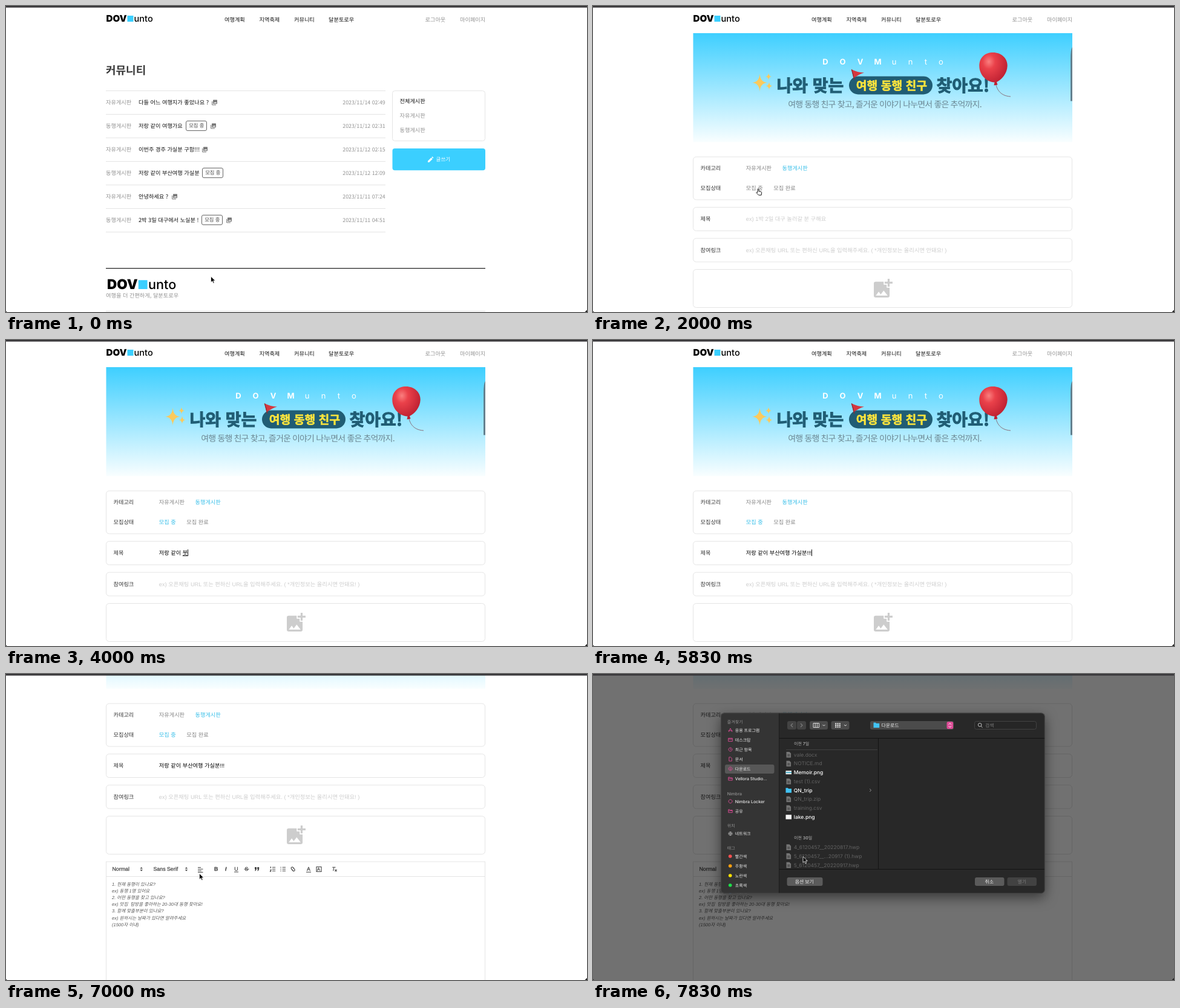
These frames come from a looping animation (960 by 507 pixels, 8000 ms). An HTML page:

```html
<!DOCTYPE html>
<html lang="ko">
<head>
<meta charset="utf-8">
<title>커뮤니티</title>
<style>
html, body { margin: 0; width: 100%; height: 100%; overflow: hidden; background: #fff; }
svg { display: block; width: 100vw; height: 100vh; }
text { font: 9.2px "Noto Sans CJK KR", "Noto Sans CJK", sans-serif; fill: #111; white-space: pre; text-rendering: geometricPrecision; }
.m { font-weight: 500; }
.g { fill: #929292; }
.label { font-weight: 500; fill: #333; }
.opt { fill: #858585; }
.opt.on { fill: #38bfe9; }
.hint, .typed { font-family: "Liberation Sans", "Noto Sans CJK KR", sans-serif; }
.hint { font-size: 9.27px; fill: #cdcdcd; }
.typed { fill: #000; }
.box { fill: #fff; stroke: #e5e5e5; }
.rule { stroke: #e4e4e4; }
.tool { font: 8.8px "Liberation Sans", sans-serif; fill: #444; stroke: #444; stroke-width: .25; }
.memo { font: italic 7.5px "Liberation Sans", "Noto Sans CJK KR", sans-serif; fill: #5a5a5a; }
.logo { font: 900 15.2px Inter, sans-serif; fill: #000; }
.thin { font-weight: 500; font-size: 14.6px; }
.spaced { font: 700 13px Inter, sans-serif; fill: #fff; text-anchor: middle; }
.head { font-size: 28px; font-weight: 900; fill: #205d74; stroke: #205d74; stroke-width: 1; }
.pill { font-size: 19.3px; font-weight: 700; fill: #ffe63c; stroke: #ffe63c; stroke-width: .5; }
.line { fill: none; stroke: #444; stroke-width: 1.1; }
.side { font-size: 7px; font-weight: 500; fill: #ececec; }
.side, .file, .btn { font-family: Inter, "Noto Sans CJK KR", sans-serif; }
.cap { fill: #929292; }
.file { font-size: 8.5px; fill: #626262; }
.file.on { fill: #fff; font-weight: 500; }
.btn { font-size: 7.9px; font-weight: 500; fill: #eee; }
.ico { fill: none; stroke: var(--accent); stroke-width: .9; }
.shadow { filter: drop-shadow(0 7px 10px rgba(0, 0, 0, .5)); }
#dialog { --accent: #dc4b96; }
#dialog.idle { --accent: #8c8c8c; }
</style>
</head>
<body>
<svg viewBox="0 0 960 507" preserveAspectRatio="none">
<defs>
  <linearGradient id="sky" x2="0" y2="1"><stop stop-color="#3ecfff"/><stop offset="1" stop-color="#f9feff"/></linearGradient>
  <radialGradient id="red" cx=".34" cy=".28" r=".75"><stop stop-color="#fa7f7f"/><stop offset=".3" stop-color="#ea414a"/><stop offset="1" stop-color="#b91d2f"/></radialGradient>
  <clipPath id="panel"><rect x="211" y="64.5" width="535.5" height="299" rx="6"/></clipPath>
  <g id="logo">
    <text class="logo">DOV</text>
    <rect x="35" y="-10" width="10" height="10" fill="#3bcfff"/>
    <text x="46" class="logo thin">unto</text>
  </g>
  <g id="pics">
    <path d="M.6 2.5V8.4H7" fill="none" stroke="#777"/>
    <rect x="2" width="7" height="6.8" rx=".7" fill="#777"/>
    <path d="M3 5.6 4.5 3.7 5.5 4.8 6.6 3.2 8.2 5.6Z" fill="#fff"/>
  </g>
  <path id="star" d="M0-1Q.06-.06 1 0 .06.06 0 1-.06.06-1 0-.06-.06 0-1Z" fill="#fbca5c"/>
  <path id="sort" d="M-2.2-.9 0-3.4 2.2-.9ZM-2.2.9 0 3.4 2.2.9Z" fill="#444"/>
</defs>

<g id="page">
  <use href="#logo" x="165.5" y="26"/>
  <g id="nav"></g>

  <g id="board">
    <text x="165" y="112.8" style="font-size:18px;font-weight:600;fill:#3a3a3a">커뮤니티</text>
    <g id="posts"></g>
    <rect class="box" x="638.5" y="140.5" width="153" height="83" rx="4"/>
    <text x="650.5" y="161" class="m">전체게시판</text>
    <text x="650.5" y="185" class="g">자유게시판</text>
    <text x="650.5" y="208.7" class="g">동행게시판</text>
    <rect x="638.5" y="236" width="153.5" height="36.3" rx="4" fill="#3bcfff"/>
    <path d="M697 259v-2.2l5.6-5.6 2.2 2.2-5.6 5.6ZM703.3 250.5l.8-.8q.4-.3.8 0l1.2 1.2q.3.4 0 .8l-.8.8Z" fill="#fff"/>
    <text x="710.5" y="257.3" class="m" style="font-size:8.6px;fill:#fff">글쓰기</text>
    <path d="M165 434.7H792" stroke="#222" stroke-width="1.3"/>
    <use href="#logo" transform="translate(167 469) scale(1.48)"/>
    <text x="165" y="482.6" class="g">여행을 더 간편하게, 달분토로우</text>
    <path class="rule" d="M165 505.5H792"/>
  </g>

  <g id="write">
    <rect x="165.5" y="45" width="626.5" height="180.5" fill="url(#sky)"/>
    <text y="97" class="spaced" x="384 412.5 441.5 470.5 497.5 524.5 550 575">DOVM<tspan font-weight="400">unto</tspan></text>
    <use href="#star" transform="translate(275.5 127) scale(12.5 15)"/>
    <use href="#star" transform="translate(290 117) scale(5 6)"/>
    <use href="#star" transform="translate(291 132.5) scale(5.5 7)"/>
    <text x="303.5" y="141.5" class="head">나와 맞는</text>
    <rect x="423" y="116.5" width="138" height="30" rx="15" fill="#205d74"/>
    <text x="434.8" y="138.7" class="pill">여행 동행 친구</text>
    <text x="567.5" y="141.5" class="head">찾아요!</text>
    <path d="M427 105Q437 110 448 110.5 439 113 430.5 120Z" fill="#d5373f"/>
    <path d="M427.3 105 432 122" stroke="#8f2a33" stroke-width="1.2"/>
    <text x="322.3" y="167.7" class="m" style="font-size:14px;letter-spacing:-.85px;fill:#6b8792">여행 동행 친구 찾고, 즐거운 이야기 나누면서 좋은 추억까지.</text>
    <path d="M665 127C667 137 672 149 690 150" fill="none" stroke="#84606d" stroke-width=".9"/>
    <path d="M638.3 100C638 85 648 77 661 77S685 86 684.7 99C684.4 112 675 122 667 126L668.5 130.5 662.5 131.5 663.5 126.5C650 126 638.6 114 638.3 100Z" fill="url(#red)"/>
    <path d="M792 68Q789 72 789 88V157.5H792Z" fill="#64818f"/>

    <rect id="cats" class="box" x="165.5" y="250" width="626" height="71" rx="5"/>
    <text x="177.5" y="272" class="label">카테고리</text>
    <text x="252.8" y="272" class="opt" id="free">자유게시판</text>
    <text x="312.5" y="272" class="opt" id="mate">동행게시판</text>
    <g id="state">
      <text x="177.5" y="304.5" class="label">모집상태</text>
      <text x="252.8" y="304.5" class="opt" id="open">모집 중</text>
      <text x="298.3" y="304.5" class="opt">모집 완료</text>
    </g>
    <g id="subject">
      <rect class="box" x="165.5" y="333.5" width="626" height="39" rx="5"/>
      <text x="177.5" y="356" class="label">제목</text>
      <text x="252.8" y="356" class="hint" id="hint">ex) 1박 2일 대구 놀러갈 분 구해요</text>
      <text x="252.8" y="356" class="typed" id="typed"></text>
      <rect id="caret" y="347" width=".9" height="11" fill="#000"/>
    </g>
    <g id="link">
      <rect class="box" x="165.5" y="385" width="626" height="39" rx="5"/>
      <text x="177.5" y="407.7" class="label">참여링크</text>
      <text x="252.8" y="407.7" class="hint">ex) 오픈채팅 URL 또는 편하신 URL을 입력해주세요. ( *개인정보는 올리시면 안돼요! )</text>
    </g>
    <g id="rest">
      <rect class="box" x="165.5" y="436.5" width="626" height="63" rx="5"/>
      <path transform="translate(459.1 448.7) scale(1.63)" fill="#cdcdcd" d="M19 7v3h-2V7h-3V5h3V2h2v3h3v2ZM16 11V8h-3V5H5q-2 0-2 2v12q0 2 2 2h12q2 0 2-2v-8ZM5 19l3-4 2 3 3-4 4 5Z"/>
      <rect class="box" x="165.5" y="512" width="626" height="300"/>
      <path class="rule" d="M165 536.5H792"/>
      <text x="175.5" y="527.2" class="tool">Normal</text>
      <text x="243.5" y="527.2" class="tool">Sans Serif</text>
      <use href="#sort" x="223.7" y="524.3"/>
      <use href="#sort" x="298" y="524.3"/>
      <g id="tools"></g>
      <g id="memo"></g>
    </g>
  </g>
</g>

<rect id="dim" width="960" height="507" fill="#000" opacity=".555"/>
<rect width="960" height="2.6" fill="#39383b"/>
<path d="M0 505.3 1.7 507H0ZM960 503.5V507H956.5Z" fill="#222"/>

<g id="dialog">
  <rect class="shadow" x="211" y="64.5" width="535.5" height="299" rx="6" fill="#282828"/>
  <g clip-path="url(#panel)">
    <path d="M211 64H747V364H211Z" fill="#282828"/>
    <path d="M211 64H307.5V364H211Z" fill="#343434"/>
    <path d="M307.5 106.5H747M307.5 323.5H747M471.5 106V323" stroke="#131313"/>
    <path d="M307.5 64V364" stroke="#1c1c1c"/>
    <rect x="218" y="150" width="81.5" height="15" rx="3" fill="#575757"/>
    <g id="side"></g>
  </g>
  <rect x="211.3" y="64.8" width="535" height="298.5" rx="6" fill="none" stroke="#545454" stroke-width=".8"/>
  <g id="bars"></g>
  <path d="M330 82 327 85 330 88M343 82 346 85 343 88" fill="none" stroke="#7c7c7c" stroke-width="1.2"/>
  <path d="M364 81.5h9.5v7H364ZM367.2 81.5v7M370.4 81.5v7M379.5 84l2 2 2-2M415 84l2 2 2-2" fill="none" stroke="#ddd"/>
  <path d="M400 82.3H409M400 85H409M400 87.8H409" stroke="#ddd" stroke-width="1.9" stroke-dasharray="2.3 1"/>
  <path d="M463.5 80.5h3.5l1 1.2h5.2v7.3h-9.7Z" fill="#42c3f4"/>
  <text x="476.5" y="88" class="btn">다운로드</text>
  <rect x="584.5" y="79" width="10.6" height="12" rx="2.5" fill="var(--accent)"/>
  <path d="M587.6 83.8 589.8 81.6 592 83.8M587.6 86.2 589.8 88.4 592 86.2" fill="none" stroke="#fff"/>
  <path d="M642 84.3a2.8 2.8 0 1 0-5.6 0a2.8 2.8 0 1 0 5.6 0M641.2 86.5 643.5 88.8" fill="none" stroke="#ccc"/>
  <text x="648" y="88" class="btn" style="fill:#7d7d7d">검색</text>
  <path d="M319 125.5H470" stroke="#414141"/>
  <text x="332" y="118.3" class="side" style="fill:#bbb">이전 7일</text>
  <text x="332" y="274" class="side" style="fill:#bbb">이전 30일</text>
  <g id="files"></g>
  <path d="M457.3 190.3 459.5 192.6 457.3 194.9" fill="none" stroke="#999"/>
  <text x="333.7" y="346.7" class="btn">옵션 보기</text>
  <text x="647.5" y="346.7" class="btn">취소</text>
  <text x="701.5" y="346.7" class="btn" style="fill:#7d7d7d">열기</text>
</g>

<g id="cursor">
  <path id="arrow" d="M0 0V10L2.4 7.8 4 11.4 5.7 10.7 4.2 7.2H7.3Z" stroke="#fff" stroke-width=".8"/>
  <path id="hand" d="M-1 6V.9a1 1 0 0 1 2 0V4l3.6.8q1.3.3 1.1 1.6L5.1 10.3H.7L-3.2 6.3q.6-1.5 2.2-.3Z" fill="#fff" stroke="#000" stroke-width=".9"/>
  <path id="beam" d="M-2-5Q0-5 0-4 0-5 2-5M0-4V4M-2 5Q0 5 0 4 0 5 2 5" fill="none" stroke="#222" stroke-width=".9"/>
</g>
</svg>

<script>
const $ = id => document.getElementById(id);
const text = (x, y, s, cls = '', extra = '') => `<text x="${x}" y="${y}" class="${cls}" ${extra}>${s}</text>`;
const rect = (x, y, w, h, fill, extra = 'rx="3"') => `<rect x="${x}" y="${y}" width="${w}" height="${h}" fill="${fill}" ${extra}/>`;
const fill = (id, items, draw) => $(id).innerHTML = items.map(draw).join('');

fill('nav', [[361, '여행계획'], [418.5, '지역축제'], [476, '커뮤니티'], [533, '달분토로우'], [692.5, '로그아웃'], [750, '마이페이지']],
  ([x, s]) => text(x, 26, s, x > 600 ? 'g' : 'm'));

// title, date, badge x, picture icon x
const posts = [
  ['다들 어느 여행지가 좋았나요 ?', '14 02:49', 0, 340],
  ['저랑 같이 여행가요', '12 02:31', 297, 338],
  ['이번주 경주 가실분 구함!!!', '12 02:15', 0, 324],
  ['저랑 같이 부산여행 가실분', '12 12:09', 324, 0],
  ['안녕하세요 ?', '11 07:24', 0, 274],
  ['2박 3일 대구에서 노실분 !', '11 04:51', 323, 364]
];
fill('posts', posts, ([title, date, badge, icon], i) => {
  const y = 162.5 + i * 39;
  return `<path class="rule" d="M165 ${y - 22}H627"/>` +
    text(165, y, badge ? '동행게시판' : '자유게시판', 'g') + text(219, y, title, 'm') +
    text(626.7, y, '2023/11/' + date, 'g', 'text-anchor="end" style="font-size:8.8px"') +
    (badge ? rect(badge + .5, y - 11, 34, 16, '#fff', 'rx="2.5" stroke="#666"') +
      text(badge + 5.2, y - .4, '모집 중', '', 'style="font-size:8.3px;fill:#444"') : '') +
    (icon ? `<use href="#pics" x="${icon}" y="${y - 7}"/>` : '');
});
$('posts').innerHTML += '<path class="rule" d="M165 374.5H627"/>';

const glyphs = [[344, 'B', 'font-weight:700'], [362, 'I', 'font-style:italic;font-weight:700'], [377.2, 'U', ''], [394.5, 'S', ''],
  [497, 'A', ''], [514, 'A', 'font-size:7.5px'], [538.5, 'T', 'font-style:italic']];
fill('tools', glyphs, ([x, s, css]) => text(x, 527.2, s, 'tool', `style="${css}"`));
$('tools').innerHTML += `<path class="line" d="M317 521.5h5M317 524.3h8.5M317 527h6M317 529.5h8.5M377 529h7M393.5 524.3h8M496 529.2h8
  M440 521.3h5.2M440 524.3h5.2M440 527.3h5.2M437.3 520v3M436.3 525.5h1.8l-1.6 2.7h1.8
  M456.6 521.3h5.4M456.6 524.3h5.4M456.6 527.3h5.4M453.3 521.3h1.4M453.3 524.3h1.4M453.3 527.3h1.4
  M473.5 525.6l-1.8-1.6q-1.2-1.4 0-2.6 1.4-1.2 2.6 0l1.8 1.8M474.6 522.6l2 1.8q1.2 1.4 0 2.6-1.4 1.2-2.6 0l-1.8-1.8
  M513 520.5h8v8h-8ZM543.5 525l3 3.2M546.5 525l-3 3.2"/>
  <path d="M411 521h3v3.6l-1.5 2.6h-1.3l.8-2.6h-1ZM415.2 521h3v3.6l-1.5 2.6h-1.3l.8-2.6h-1Z" fill="#444"/>`;

fill('memo', ['1. 현재 동행이 있나요?', 'ex) 동행 1명 있어요', '2. 어떤 동행을 찾고 있나요?', 'ex) 맛집  탐방을 좋아하는 20-30대 동행 찾아요!',
  '3. 함께 맞출부분이 있나요?', 'ex) 원하시는 날짜가 있다면 알려주세요', '(1500자 이내)'], (s, i) => text(175, 552 + i * 11.1, s, 'memo'));

const ring = 'M0-3A3 3 0 1 1-.01-3';
const folder = 'M-3.2-2.5H-1L-.2-1.5H3.2V2.6H-3.2ZM-3.2-.4H3.2';
const places = [
  [79, '즐겨찾기'], [93, '응용 프로그램', 'M-3 3 0-3 3 3M-3.4.8H3.4'], [109, '데스크탑', 'M-3.3-2.6h6.6v5.2h-6.6ZM-3.3-1h6.6'],
  [125, '최근 항목', ring + 'M0-1.7V.2H1.4'], [141, '문서', 'M-2.2-3.2H.6L2.3-1.5V3.2H-2.2Z'],
  [157, '다운로드', ring + 'M0-1.5V1.4M-1.2.3 0 1.5 1.2.3'], [173.5, 'Vellora Studio...', folder],
  [198.5, 'Nimbra'], [211, 'Nimbra Locker', ring], [227, '공유', folder],
  [251, '위치'], [264.5, '네트워크', ring + 'M-3 0H3M0-3Q-2.5 0 0 3 2.5 0 0-3'],
  [288.5, '태그'], [302, '빨간색', '#ff5050'], [318, '주황색', '#ffa010'], [334, '노란색', '#ffe100'], [350, '초록색', '#1ddf4a'], [366, '파란색', '#2f8bff']
];
fill('side', places, ([y, s, mark]) => {
  if (!mark) return text(221.8, y + 2.7, s, 'side cap');
  const icon = mark[0] == '#' ? `<circle cx="226.7" cy="${y}" r="2.8" fill="${mark}"/>`
    : `<path class="ico" d="${mark}" transform="translate(227 ${y})" ${s == '네트워크' ? 'style="stroke:#a5a5a5"' : ''}/>`;
  return icon + text(234.8, y + 2.7, s, 'side');
});

fill('bars', [[321, 78, 15, '#434343'], [337, 78, 15, '#434343'], [358, 78, 30, '#4b4b4b'], [393.5, 78, 30, '#4b4b4b'], [458, 78, 138, '#4b4b4b'],
  [320.5, 337, 59, '#5b5b5b'], [631, 337, 48.5, '#5b5b5b'], [684.5, 337, 48.5, '#424242']], ([x, y, w, c]) => rect(x, y, w, 14, c));
$('bars').innerHTML += rect(630.5, 78.5, 102, 13, '#262626', 'rx="3" stroke="#434343"');

const page = y => `<path d="M319.5 ${y - 4.7}h5l2.6 2.6v7h-7.6Z" fill="#747474"/><path d="M321.3 ${y}h4M321.3 ${y + 2}h4" stroke="#3a3a3a"/>`;
const thumbs = {
  'Memoir.png': y => rect(318.5, y - 3, 9.5, 6, '#eee', '') + rect(318.5, y - 1, 9.5, 2, '#4fb4cf', ''),
  'QN_trip': y => `<path d="M318.5 ${y - 4}h3.5l1 1.2h5v6.8h-9.5Z" fill="#42c3f4"/>`,
  'lake.png': y => rect(318.5, y - 3.7, 9.5, 7.4, '#f4f4f4', '')
};
const files = ['vale.docx', 'NOTICE.md', 'Memoir.png', 'test (1).csv', 'QN_trip', 'QN_trip.zip', 'training.csv', 'lake.png',
  '4_6120457__20220817.hwp', '5_6120457__...20917 (1).hwp', '5_6120457__20220917.hwp'];
fill('files', files, (s, i) => {
  const y = i < 8 ? 133.7 + i * 14.75 : 287 + (i - 8) * 14.75, thumb = thumbs[s];
  return (thumb || page)(y) + text(331.8, y + 3, s, thumb ? 'file on' : 'file');
});

// Timelines are keyed by step, six steps a second.
const moves = {
  0: [338.5, 448, 'arrow'], 1: [520, 340, 'arrow'], 2: [712, 254, 'hand'], 3: [655, 240, 'arrow'], 4: [506, 210, 'arrow'],
  5: [400, 234, 'arrow'], 6: [350, 261, 'arrow'], 7: [336, 268, 'hand'], 9: [334, 270, 'hand'], 10: [320, 282, 'arrow'],
  11: [292, 297, 'arrow'], 12: [273, 303, 'hand'], 15: [286, 332, 'arrow'], 16: [292, 353, 'beam'], 17: [0, 0, ''],
  37: [300, 354, 'beam'], 38: [303, 350, 'arrow'], 40: [309, 343, 'arrow'], 42: [319.5, 330.5, 'arrow'],
  43: [338, 288, 'arrow'], 44: [342, 293, 'arrow'], 45: [345, 299, 'arrow'], 46: [347, 302.5, 'arrow']
};
const a = '저랑 같이 ', b = a + '부산여행 ';
const typing = {
  0: '', 17: '저', 18: '저라', 19: '저랑', 21: '저랑 ', 22: '저랑 가', 23: '저랑 같이', 24: a + '붓', 25: a + '부사', 26: a + '부산',
  27: a + '부산여', 28: a + '부산여행', 29: b, 30: b + '가', 31: b + '가시', 32: b + '가실부', 33: b + '가실분', 34: b + '가실분!!', 35: b + '가실분!!!'
};
const scrolls = { 0: 0, 38: 14, 39: 70, 40: 140, 41: 188, 42: 201 };

const at = (line, k) => {
  while (!(k in line)) k--;
  return line[k];
};
const show = (id, on) => $(id).style.display = on ? '' : 'none';
const move = (id, x, y) => $(id).setAttribute('transform', `translate(${x} ${y})`);

function draw(k) {
  const mate = k >= 8, modal = k >= 43, str = at(typing, k);
  show('board', k < 3);
  show('write', k >= 3);
  show('state', mate);
  show('link', mate);
  $('cats').setAttribute('height', mate ? 71 : 39);
  move('subject', 0, mate ? 0 : -32.3);
  move('rest', 0, mate ? 0 : -84);
  $('free').classList.toggle('on', !mate);
  $('mate').classList.toggle('on', mate);
  $('open').classList.toggle('on', k >= 13);

  show('hint', !str);
  // the syllable still being composed is underlined
  $('typed').innerHTML = str.replace(/[가-힣]$/, '<tspan text-decoration="underline">$&</tspan>');
  show('caret', k >= 16 && k < 38);
  if (k >= 3) $('caret').setAttribute('x', 252.8 + (str ? $('typed').getComputedTextLength() : 0));

  move('page', 0, -at(scrolls, k));
  show('dim', modal);
  show('dialog', modal);
  $('dialog').classList.toggle('idle', k < 44);

  const [x, y, kind] = at(moves, k);
  move('cursor', x, y);
  for (const id of ['arrow', 'hand', 'beam']) show(id, id == kind);
}

const start = performance.now();
let last = -1;
function tick() {
  const t = (performance.now() - start) % 8000;
  const k = Math.min(47, Math.floor((t + 4) * 6 / 1000));
  if (k != last) draw(last = k);
  requestAnimationFrame(tick);
}
tick();
</script>
</body>
</html>
```
